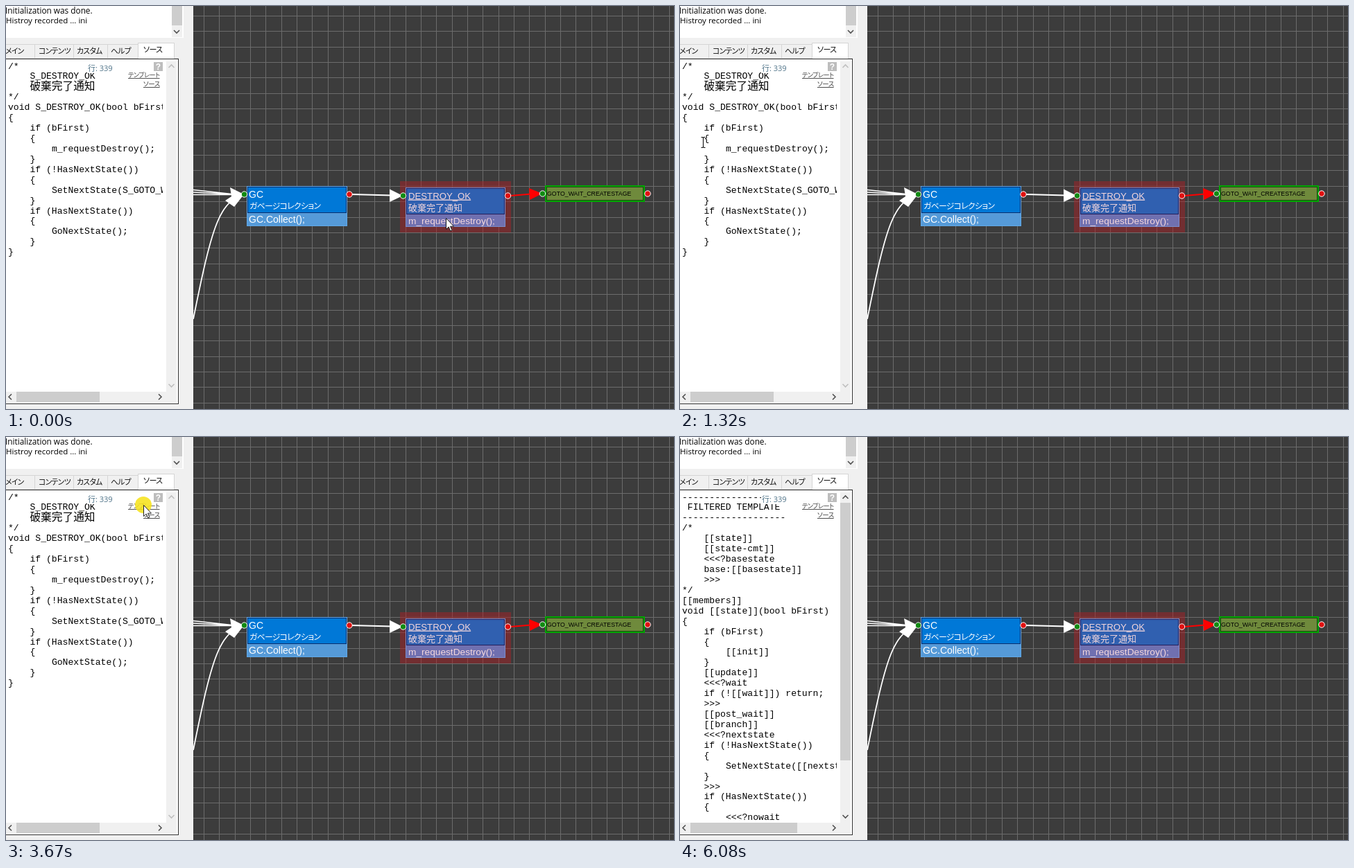
Write an HTML page that moves like this. It is 963 px wide and 582 px high and loops after 8240 ms.

```html
<!DOCTYPE html>
<html lang="ja">
<head>
<meta charset="utf-8">
<title>State editor</title>
<style>
html, body { margin: 0; width: 100%; height: 100%; overflow: hidden; background: #f0f0f0; }
svg { display: block; }
text { white-space: pre; font-family: "Liberation Sans", "Noto Sans CJK JP", sans-serif; }
.ui { font-family: "Open Sans", "Noto Sans CJK JP", sans-serif; }
.jp { font-family: "Noto Sans CJK JP", "Noto Sans CJK", sans-serif; }
.code { font-family: "Liberation Mono", "Noto Sans CJK JP", monospace; font-size: 13.1px; }
.wide { font-size: 15.7px; }
.kana { font-size: .9em; letter-spacing: -.06em; font-feature-settings: "palt"; }
.link { text-decoration: underline; }
rect { shape-rendering: crispEdges; }
</style>
</head>
<body>
<svg id="stage" width="963" height="582" viewBox="0 0 963 582"></svg>
<script>
const LOOP = 8240;
const NS = "http://www.w3.org/2000/svg";
const stage = document.getElementById("stage");

function el(parent, tag, attrs, content) {
  const node = document.createElementNS(NS, tag);
  for (const k in attrs) node.setAttribute(k, attrs[k]);
  if (content !== undefined) node.textContent = content;
  parent.appendChild(node);
  return node;
}
const group = (parent, attrs = {}) => el(parent, "g", attrs);
const rect = (p, x, y, width, height, fill, more) =>
  el(p, "rect", { x, y, width, height, fill, ...more });
const frame = (p, x, y, w, h, fill, stroke) =>
  rect(p, x + .5, y + .5, w - 1, h - 1, fill, { stroke });
const path = (p, d, fill, more) => el(p, "path", { d, fill, ...more });
const line = (p, d, stroke, width) =>
  path(p, d, "none", { stroke, "stroke-width": width });

// Text with kana runs set in a narrower proportional style.
function label(p, x, y, size, text, fill = "#111", cls = "jp") {
  const t = el(p, "text", { x, y, "font-size": size, fill, class: cls });
  for (const run of text.match(/[\u30a0-\u30ff\u3040-\u309f]+|[^\u30a0-\u30ff\u3040-\u309f]+/g))
    el(t, "tspan", /[\u3040-\u30ff]/.test(run) ? { class: "kana" } : {}, run);
  return t;
}

function chevron(p, x, y, angle, color) {
  path(p, "M-4-2L0 2L4-2", "none", {
    stroke: color, "stroke-width": 1.6, transform: `translate(${x} ${y}) rotate(${angle})`
  });
}

function port(p, x, y, fill) {
  el(p, "circle", { cx: x, cy: y, r: 4.2, fill, stroke: "#fff", "stroke-width": 1 });
}

function drawGraph(p) {
  rect(p, 270, 0, 693, 582, "#3c3c3c");
  let grid = "";
  for (let x = 285; x < 963; x += 22.35) grid += `M${Math.round(x) + .5} 0V582`;
  for (let y = 14; y < 582; y += 22.35) grid += `M270 ${Math.round(y) + .5}H963`;
  line(p, grid, "#6c6c6c", 1);

  line(p, "M270 265.5L330 272M270 269L330 272M270 272.5H330", "#fff", 1.6);
  line(p, "M270 452C279 408 292 340 306 309C314 291 322 282 332 277", "#fff", 1.8);
  path(p, "M323 262L343 272L329 290L316 281L325 275Z", "#fff");
  line(p, "M497 272L556 273.5", "#fff", 2);
  path(p, "M553 264.5L572 274L553 283Z", "#fff");

  frame(p, 347, 260, 145, 58, "#0078d7", "#5fa8e8");
  frame(p, 348, 261, 143, 38, "#0078d7", "#0b2f6e");
  rect(p, 348, 299, 143, 18, "#559ad8");
  label(p, 350, 276.5, 14, "GC", "#fff", "");
  label(p, 351, 293, 13.2, "ガベージコレクション", "#fff");
  label(p, 350, 312.5, 14, "GC.Collect();", "#fff", "");

  rect(p, 568, 253, 160, 74, "#a82026", { "fill-opacity": .5 });
  frame(p, 576, 262, 144, 57, "#3060b0", "#7c8ecb");
  frame(p, 577, 263, 142, 38, "#3060b0", "#241f5c");
  rect(p, 577, 301, 142, 17, "#7070b0");
  const tint = "#f2d6dc";
  label(p, 580, 278.5, 13.2, "DESTROY_OK", tint, "link");
  label(p, 580, 295.5, 13, "破棄完了通知", tint);
  label(p, 580, 314.5, 13.7, "m_requestDestroy();", tint, "");

  line(p, "M727 274L757 271.5", "#f00", 2);
  path(p, "M754 263L773 271L755 280Z", "#f00");

  rect(p, 778, 260, 142, 22, "#6f8a3c", { stroke: "#00a800", "stroke-width": 2 });
  frame(p, 779, 261, 140, 20, "none", "#26401a");
  label(p, 780, 273.5, 8.8, "GOTO_WAIT_CREATESTAGE", "#000", "");

  for (const [x, y] of [[343.5, 272], [572.5, 274], [773.5, 271]]) port(p, x, y, "#118a11");
  for (const [x, y] of [[495, 272], [723.5, 274], [925, 271]]) port(p, x, y, "#e01010");
}

function drawSide(p) {
  rect(p, 0, 0, 270, 582, "#f0f0f0");
  rect(p, 0, 0, 256, 46, "#fff");
  rect(p, 239, 0, 15, 45, "#f0f0f0");
  rect(p, 239, 0, 15, 28, "#cdcdcd");
  chevron(p, 246, 37, 0, "#505050");
  label(p, -1, 11, 11.8, "Initialization was done.", "#000", "ui");
  label(p, 0, 25, 11.5, "Histroy recorded ... ini", "#000", "ui");

  line(p, "M0 55.5H191M41.5 55V76M97.5 55V76M146.5 55V76M0 75.5H249", "#d5d5d5", 1);
  frame(p, 190, 53, 53, 24, "#fff", "#d5d5d5");
  const tabs = [[-1, "メイン"], [47, "コンテンツ"], [102, "カスタム"], [151, "ヘルプ"]];
  for (const [x, name] of tabs) label(p, x, 69, 12, name);
  label(p, 198, 67, 12.3, "ソース");

  rect(p, -2.5, 76.5, 251, 498, "#fff", { stroke: "#333" });
  rect(p, 231, 80, 15, 492, "#f0f0f0");
  rect(p, 0, 557, 246, 15, "#f0f0f0");
  chevron(p, 6, 564.5, 90, "#505050");
  chevron(p, 222, 564.5, -90, "#505050");
}

function drawPage(p, lines, thumb, tall) {
  const page = group(p);
  const body = group(page, { "clip-path": "url(#pane)" });
  lines.forEach((s, i) => {
    const pad = s.length - s.trimStart().length;
    const wide = /[^\x00-\x7f]/.test(s);
    el(body, "text", {
      x: 3 + pad * 7.86, y: 90.5 + i * 14.93 + (wide ? 1 : 0),
      class: wide ? "jp wide" : "code", fill: "#000"
    }, s.trimStart());
  });
  rect(page, 15, 557, thumb, 15, "#cdcdcd");
  if (tall) rect(page, 231, 95, 15, 372, "#cdcdcd");
  const ink = tall ? "#505050" : "#bfbfbf";
  chevron(page, 238.5, 87, 180, ink);
  chevron(page, 238.5, 548, 0, ink);
  return page;
}

function drawOverlay(p) {
  rect(p, 117, 82, 36, 15, "#fff");
  label(p, 118, 94, 11, "行: 339", "#4f7388", "ui");
  rect(p, 213, 81, 13, 13, "#bdbdbd");
  el(p, "text", { x: 219.5, y: 92, "font-size": 12, "font-weight": "bold", "text-anchor": "middle", fill: "#fff" }, "?");
  label(p, 176, 103, 10.2, "テンプレート", "#444", "jp link");
  label(p, 198, 116, 10.6, "ソース", "#444", "jp link");
}

function drawMenu(p) {
  const menu = group(p);
  frame(menu, 614, 298, 207, 281, "#fdfdfd", "#a8a8a8");
  const items = ["アイテム編集", "分岐編集", "コメント消去", "削除", "種別変更>", "コピー",
    "ステート名コピー", "ソースへ", "リンクへジャンプ>", "フォーカス>"];
  items.forEach((s, i) => {
    const y = 313 + i * 27.8;
    label(menu, 626, y + 6, 16.7, s.replace(">", ""));
    if (s.endsWith(">")) path(menu, `M805.5 ${y - 4}l4.5 4l-4.5 4z`, "#111");
  });
  return menu;
}

const stateCode = `/*
    S_DESTROY_OK
    破棄完了通知
*/
void S_DESTROY_OK(bool bFirst)
{
    if (bFirst)
    {
        m_requestDestroy();
    }
    if (!HasNextState())
    {
        SetNextState(S_GOTO_WAIT_CREATESTAGE);
    }
    if (HasNextState())
    {
        GoNextState();
    }
}`.split("\n");

const rule = "-".repeat(19);
const templateCode = `${rule}
 FILTERED TEMPLATE
${rule}
/*
    [[state]]
    [[state-cmt]]
    <<<?basestate
    base:[[basestate]]
    >>>
*/
[[members]]
void [[state]](bool bFirst)
{
    if (bFirst)
    {
        [[init]]
    }
    [[update]]
    <<<?wait
    if (![[wait]]) return;
    >>>
    [[post_wait]]
    [[branch]]
    <<<?nextstate
    if (!HasNextState())
    {
        SetNextState([[nextstate]]);
    }
    >>>
    if (HasNextState())
    {
        <<<?nowait`.split("\n");

const clip = el(el(stage, "defs", {}), "clipPath", { id: "pane" });
rect(clip, 0, 80, 226, 476, "#000");

drawGraph(stage);
drawSide(stage);
const statePage = drawPage(stage, stateCode, 120, false);
const templatePage = drawPage(stage, templateCode, 154, true);
drawOverlay(stage);
const menu = drawMenu(stage);
const click = el(stage, "circle", { cx: 198, cy: 98, r: 12, fill: "#f6e31c", "fill-opacity": .88 });
const arrow = path(stage, "M.5.5V16.5L4.2 13L6.7 18.8L9 17.8L6.5 12.2H11.5Z", "#fff", { stroke: "#222", "stroke-width": 1 });
const beam = line(stage, "M-3-7.5H-1L0-6.5L1-7.5H3M0-6.5V6.5M-3 7.5H-1L0 6.5L1 7.5H3", "#111", 1.1);

// Pointer legs: start time, number of steps, end point.
const STEP = 77;
const legs = [
  [1010, 4, 33, 197],
  [1560, 10, 195, 120],
  [2330, 1, 200, 123],
  [2400, 4, 198, 98],
  [4440, 10, 14, 427],
  [5210, 1, 12, 431],
  [5290, 10, 311, 500]
];
const ease = u => u * u * (3 - 2 * u);

function pointer(t) {
  let x = 634, y = 306;
  for (const [start, n, tx, ty] of legs) {
    if (t < start) break;
    const k = Math.min(n, Math.floor((t - start + 15) / STEP) + 1);
    const u = ease(k / n);
    x += (tx - x) * u;
    y += (ty - y) * u;
  }
  return [Math.round(x), Math.round(y)];
}

const show = (node, on) => node.setAttribute("visibility", on ? "visible" : "hidden");

function render(t) {
  show(menu, t >= 550 && t < 1320);
  show(click, t >= 3670 && t < 3820);
  show(statePage, t < 3820);
  show(templatePage, t >= 3820);

  const [x, y] = pointer(t);
  const onLink = x > 175 && x < 224 && y > 94 && y < 118;
  const inText = x < 231 && y > 80 && y < 556 && !onLink;
  const seen = t < 6080;
  show(arrow, seen && !inText);
  show(beam, seen && inText);
  arrow.setAttribute("transform", `translate(${x} ${y})`);
  beam.setAttribute("transform", `translate(${x + .5} ${y})`);
}

const begin = performance.now();
function tick() {
  render((performance.now() - begin) % LOOP);
  requestAnimationFrame(tick);
}
tick();
</script>
</body>
</html>
```
